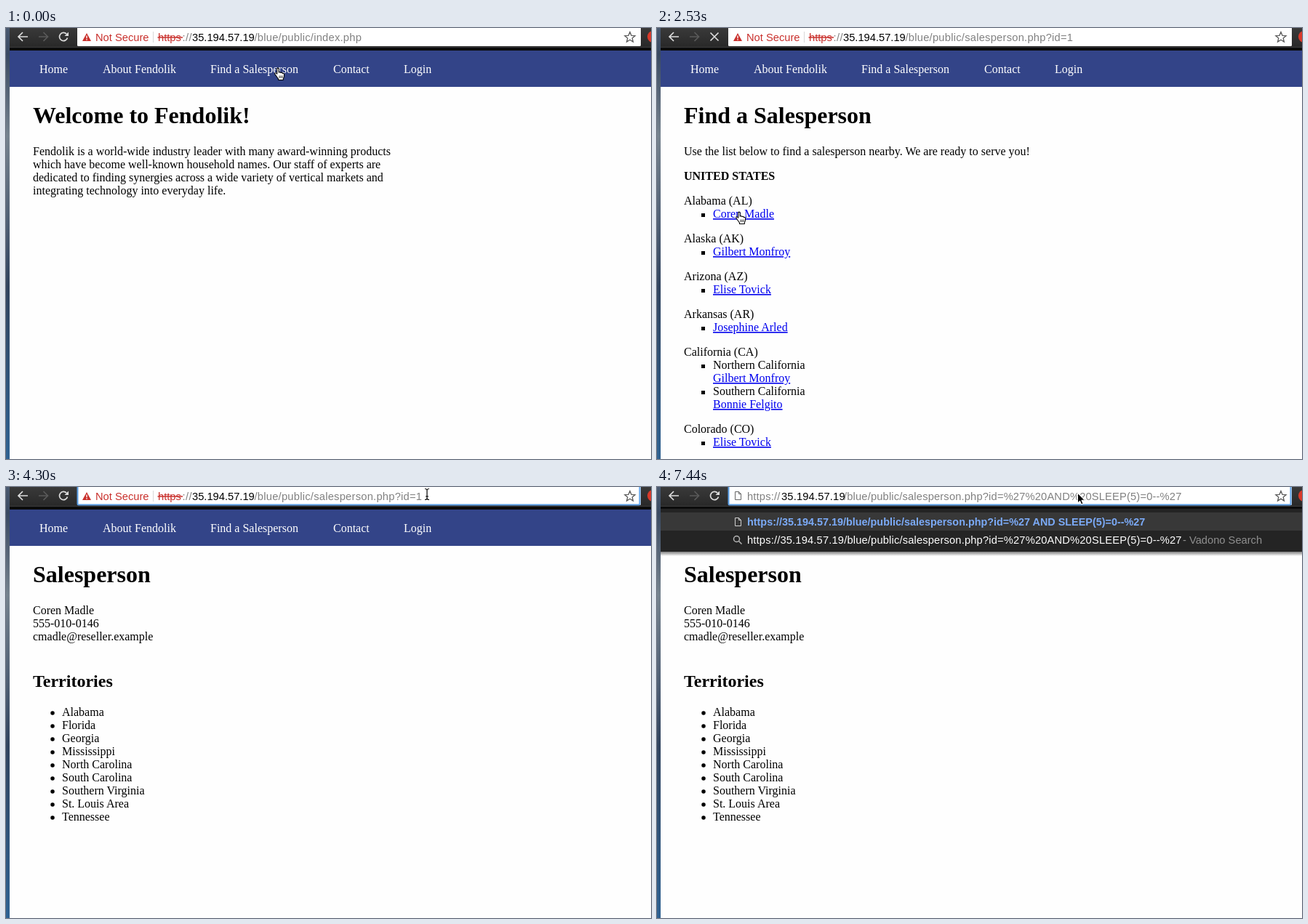
Animation, 887 px wide and 593 px high, one loop 8000 ms. Source, as an HTML page:

```html
<!DOCTYPE html>
<html lang="en">
<head>
<meta charset="utf-8">
<title>Browser session</title>
<style>
html, body { margin: 0; width: 100%; height: 100%; overflow: hidden; background: #fefefe; }
svg { display: block; width: 887px; height: 593px; }
text { white-space: pre; }

.page { font: 16px "Liberation Serif", "Times New Roman", serif; }
.h1 { font-size: 32px; font-weight: bold; }
.h2 { font-size: 24px; font-weight: bold; }
.b { font-weight: bold; }
.a { fill: #00e; text-decoration: underline; }
.bar { font: 14.7px "Liberation Sans", Arial, sans-serif; }
.path { fill: #808080; letter-spacing: .25px; }
.long { letter-spacing: .165px; }
.red { fill: #c9302c; }
.line { fill: none; stroke-width: 1.7; }

/* 8 s loop of hard cuts: 1% = 80 ms */
.t { animation: 8s step-end infinite; }
.reload { animation-name: reload; }
.stop { animation-name: stop; }
.home { animation-name: home; }
.list { animation-name: list; }
.person { animation-name: person; }
.url-home { animation-name: url-home; }
.url-list { animation-name: url-list; }
.url-person { animation-name: url-person; }
.before { animation-name: before; }
.after { animation-name: after; }
.focus { animation-name: focus; }
.sel-all { animation-name: sel-all; }
.sel-id { animation-name: sel-id; }
.caret { animation-name: caret; }
.caret-end { animation-name: caret-end; }
.cursor { animation-name: move; }
.hand { animation-name: hand; }
.arrow { animation-name: arrow; }
.beam { animation-name: beam; }

@keyframes reload { 0%, 7.5%, 33.375% { visibility: visible } 1.875%, 31.625% { visibility: hidden } 100% { visibility: visible } }
@keyframes stop { 0%, 7.5%, 33.375%, 100% { visibility: hidden } 1.875%, 31.625% { visibility: visible } }
@keyframes home { 0% { visibility: visible } 7.5%, 100% { visibility: hidden } }
@keyframes list { 0%, 33.375%, 100% { visibility: hidden } 7.5% { visibility: visible } }
@keyframes person { 0% { visibility: hidden } 33.375%, 100% { visibility: visible } }
@keyframes url-home { 0% { visibility: visible } 5.625%, 100% { visibility: hidden } }
@keyframes url-list { 0%, 31.625%, 100% { visibility: hidden } 5.625% { visibility: visible } }
@keyframes url-person { 0%, 85.5%, 100% { visibility: hidden } 31.625% { visibility: visible } }
@keyframes before { 0% { visibility: visible } 85.5%, 100% { visibility: hidden } }
@keyframes after { 0% { visibility: hidden } 85.5%, 100% { visibility: visible } }
@keyframes focus { 0% { visibility: hidden } 46.25%, 100% { visibility: visible } }
@keyframes sel-all { 0%, 53.75%, 100% { visibility: hidden } 46.25% { visibility: visible } }
@keyframes sel-id { 0%, 85.5%, 100% { visibility: hidden } 70.625% { visibility: visible } }
@keyframes caret { 0%, 63.125%, 70.625%, 100% { visibility: hidden } 55.625%, 68.75% { visibility: visible } }
@keyframes caret-end { 0%, 93%, 100% { visibility: hidden } 85.5% { visibility: visible } }
@keyframes hand { 0%, 27.875% { visibility: visible } 18.75%, 37.125%, 100% { visibility: hidden } }
@keyframes arrow { 0%, 27.875%, 42.625% { visibility: hidden } 18.75%, 37.125%, 85.5%, 100% { visibility: visible } }
@keyframes beam { 0%, 85.5%, 100% { visibility: hidden } 42.625% { visibility: visible } }
@keyframes move {
  0% { transform: translate(374px, 55px) }
  16.875% { transform: translate(363px, 66px) }
  18.75% { transform: translate(300px, 128px) }
  20.5% { transform: translate(217px, 194px) }
  22.375% { transform: translate(152px, 239px) }
  24.25% { transform: translate(119px, 262px) }
  26% { transform: translate(104px, 269px) }
  27.875% { transform: translate(113px, 253px) }
  37.125% { transform: translate(180px, 200px) }
  39% { transform: translate(385px, 70px) }
  40.75% { transform: translate(553px, -7px) }
  42.625% { transform: translate(579px, 8px) }
  44.375% { transform: translate(581px, 14px) }
  46.25% { transform: translate(582px, 16px) }
  53.75% { transform: translate(579px, 10px) }
  85.5%, 100% { transform: translate(578px, 8px) }
}
</style>
</head>
<body>
<svg viewBox="0 0 887 593">
  <defs>
    <linearGradient id="desk" x2="0" y2="1">
      <stop stop-color="#4a5a70"/>
      <stop offset=".06" stop-color="#3a4a62"/>
      <stop offset=".25" stop-color="#76838f"/>
      <stop offset=".42" stop-color="#566579"/>
      <stop offset=".6" stop-color="#31445f"/>
      <stop offset="1" stop-color="#2f6292"/>
    </linearGradient>
    <linearGradient id="tool" x2="0" y2="1">
      <stop stop-color="#393939"/>
      <stop offset="1" stop-color="#282828"/>
    </linearGradient>
    <linearGradient id="shade" x2="0" y2="1">
      <stop stop-opacity=".5"/>
      <stop offset="1" stop-opacity="0"/>
    </linearGradient>
    <path id="doc" d="M.5.5H5.5L8.5 3.5V11.5H.5ZM5.5.5V3.5H8.5" fill="none"/>
  </defs>

  <rect width="887" height="593" fill="#fefefe"/>
  <rect width="5" height="593" fill="url(#desk)"/>

  <g class="page">
    <rect x="5" y="31" width="882" height="50" fill="#334488"/>
    <g fill="#fff">
      <text x="46" y="62">Home</text>
      <text x="133" y="62">About Fendolik</text>
      <text x="281" y="62">Find a Salesperson</text>
      <text x="450" y="62">Contact</text>
      <text x="547" y="62">Login</text>
    </g>

    <g class="t home">
      <text class="h1" x="37" y="131">Welcome to Fendolik!</text>
      <text y="175"><tspan x="37">Fendolik is a world-wide industry leader with many award-winning products</tspan><tspan x="37" dy="18">which have become well-known household names. Our staff of experts are</tspan><tspan x="37" dy="18">dedicated to finding synergies across a wide variety of vertical markets and</tspan><tspan x="37" dy="18">integrating technology into everyday life.</tspan></text>
    </g>

    <g class="t list">
      <text class="h1" x="37" y="131">Find a Salesperson</text>
      <text x="37" y="175">Use the list below to find a salesperson nearby. We are ready to serve you!</text>
      <text class="b" x="37" y="209">UNITED STATES</text>
      <text x="37" y="243">Alabama (AL)</text>
      <text class="a" x="77" y="261">Coren Madle</text>
      <text x="37" y="295">Alaska (AK)</text>
      <text class="a" x="77" y="313">Gilbert Monfroy</text>
      <text x="37" y="347">Arizona (AZ)</text>
      <text class="a" x="77" y="365">Elise Tovick</text>
      <text x="37" y="399">Arkansas (AR)</text>
      <text class="a" x="77" y="417">Josephine Arled</text>
      <text x="37" y="451">California (CA)</text>
      <text x="77" y="469">Northern California</text>
      <text class="a" x="77" y="487">Gilbert Monfroy</text>
      <text x="77" y="505">Southern California</text>
      <text class="a" x="77" y="523">Bonnie Felgito</text>
      <text x="37" y="557">Colorado (CO)</text>
      <text class="a" x="77" y="575">Elise Tovick</text>
      <path d="M61 257.5h5m-5 52h5m-5 52h5m-5 52h5m-5 52h5m-5 36h5m-5 70h5" stroke="#000" stroke-width="5"/>
    </g>

    <g class="t person">
      <text class="h1" x="37" y="131">Salesperson</text>
      <text y="175"><tspan x="37">Coren Madle</tspan><tspan x="37" dy="18">555-010-0146</tspan><tspan x="37" dy="18">cmadle@reseller.example</tspan></text>
      <text class="h2" x="37" y="275">Territories</text>
      <text y="315"><tspan x="77">Alabama</tspan><tspan x="77" dy="18">Florida</tspan><tspan x="77" dy="18">Georgia</tspan><tspan x="77" dy="18">Mississippi</tspan><tspan x="77" dy="18">North Carolina</tspan><tspan x="77" dy="18">South Carolina</tspan><tspan x="77" dy="18">Southern Virginia</tspan><tspan x="77" dy="18">St. Louis Area</tspan><tspan x="77" dy="18">Tennessee</tspan></text>
      <path d="M64 311V456" stroke="#000" stroke-width="5.5" stroke-linecap="round" stroke-dasharray="0 18"/>
    </g>
  </g>

  <!-- toolbar -->
  <rect x="5" width="882" height="27" fill="url(#tool)"/>
  <rect x="5" y="26" width="882" height="5" fill="#0b0b0b"/>
  <rect x="5" y="26" width="882" height="1" fill="#3c3c3c"/>
  <g class="line" stroke="#dcdcdc">
    <path d="M30 12H17.5M23 6L17 12l6 6"/>
    <path d="M45 12H57M51.5 6l6 6l-6 6" stroke="#5a5a5a"/>
    <g class="t reload">
      <path d="M83.2 8.2A5.6 5.6 0 1 0 84.5 13.5"/>
      <path d="M86 5.5V11H80.5Z" fill="#dcdcdc" stroke="none"/>
    </g>
    <path class="t stop" d="M73.5 6.5l11 11m0-11l-11 11"/>
  </g>
  <circle cx="890" cy="12" r="8" fill="#d93a2b"/>

  <!-- address field -->
  <path d="M98 0H873V23.5q0 1.5-1.5 1.5H99.5q-1.5 0-1.5-1.5Z" fill="#fff"/>
  <path class="t focus" d="M98.5-1V23q0 1.5 1.5 1.5H870q1.500 0 1.500-1.500V-1" fill="none" stroke="#5c9fe6" stroke-width="2"/>
  <path d="M858 5.500l2 4.800 5.100.400-3.900 3.300 1.200 5-4.400-2.700-4.400 2.700 1.200-5-3.900-3.300 5.100-.400Z" fill="none" stroke="#5a5a5a" stroke-width="1.300"/>

  <g class="bar">
    <g class="t before">
      <path d="M111 7L117 18H105Z" class="red"/>
      <path d="M111 10.500v3.800m0 1v1.400" stroke="#fff" stroke-width="1.400"/>
      <text class="red" x="123" y="17.500">Not Secure</text>
      <path d="M202.500 5V20" stroke="#d8d8d8"/>
      <rect class="t sel-all" x="209" y="3" width="361" height="18" fill="#b3d4fd"/>
      <rect class="t sel-id" x="561" y="3" width="9" height="18" fill="#b3d4fd"/>
      <text class="red" x="209" y="17.500">https</text>
      <path d="M208.500 13H243" stroke="#c9302c" stroke-width="1.300"/>
      <text x="242.500" y="17.500" fill="#808080" letter-spacing=".4">://</text>
      <text x="256" y="17.500">35.194.57.19</text>
    </g>
    <g class="path">
      <text class="t url-home" x="341.500" y="17.500">/blue/public/index.php</text>
      <text class="t url-list" x="341.500" y="17.500">/blue/public/territories.php</text>
      <text class="t url-person" x="341.500" y="17.500">/blue/public/salesperson.php?id=1</text>
    </g>
    <path class="t caret" d="M569.500 4V21" stroke="#000"/>

    <!-- suggestions -->
    <g class="t after">
      <use href="#doc" x="107" y="6" stroke="#666"/>
      <text class="path long" x="124" y="17.500">https://<tspan x="171" fill="#000">35.194.57.19</tspan><tspan x="257">/blue/public/salesperson.php?id=%27%20AND%20SLEEP(5)=0--%27</tspan></text>
      <rect x="5" y="30" width="882" height="59" fill="#242424"/>
      <rect x="5" y="35" width="882" height="25" fill="#383838"/>
      <rect x="5" y="89" width="882" height="6" fill="url(#shade)"/>
      <use href="#doc" x="107" y="42" stroke="#d0d0d0"/>
      <text x="124" y="53" fill="#7baaf7" font-weight="bold" font-size="14.400">https://35.194.57.19/blue/public/salesperson.php?id=%27 AND SLEEP(5)=0--%27</text>
      <path d="M112.500 74.500l4 4M113.500 71.500a4 4 0 1 1-8 0a4 4 0 1 1 8 0" fill="none" stroke="#b5b5b5" stroke-width="1.500"/>
      <text class="long" x="124" y="78" fill="#fff">https://35.194.57.19/blue/public/salesperson.php?id=%27%20AND%20SLEEP(5)=0--%27</text>
      <text x="723" y="78" fill="#8f8f8f">- Vadono Search</text>
    </g>
    <path class="t caret-end" d="M718.500 4V21" stroke="#000"/>
  </g>

  <g class="t cursor">
    <g class="t hand">
      <path d="M-1.300 1.500C-1.300-.300 1.200-.300 1.200 1.500V6q2-.900 2.500.600 2-.800 2.600.800 2.200-.400 2.200 1.600V11q0 2-1.200 3.500v2H.500V15Q-1 13-2.700 10.500-5 8-4 7-2.800 6.300-1.300 8.200Z" fill="#fff" stroke="#000" stroke-width="1.100" stroke-linejoin="round"/>
      <path d="M2 10.500v3.500m2-3.500v3.500m2-3.500v3.500" stroke="#000" stroke-width=".8"/>
    </g>
    <path class="t arrow" d="M.5.500V14L3.600 11.100 5.700 16.100 8 15.100 5.900 10.200H10.200Z" stroke="#fff"/>
    <path class="t beam" d="M-3-7.500Q-.500-7.500 0-6 .500-7.500 3-7.500M0-6V6M-3 7.500Q-.500 7.500 0 6 .500 7.500 3 7.500M-2 3H2" fill="none" stroke="#000" stroke-width="1.200"/>
  </g>
</svg>
</body>
</html>
```
